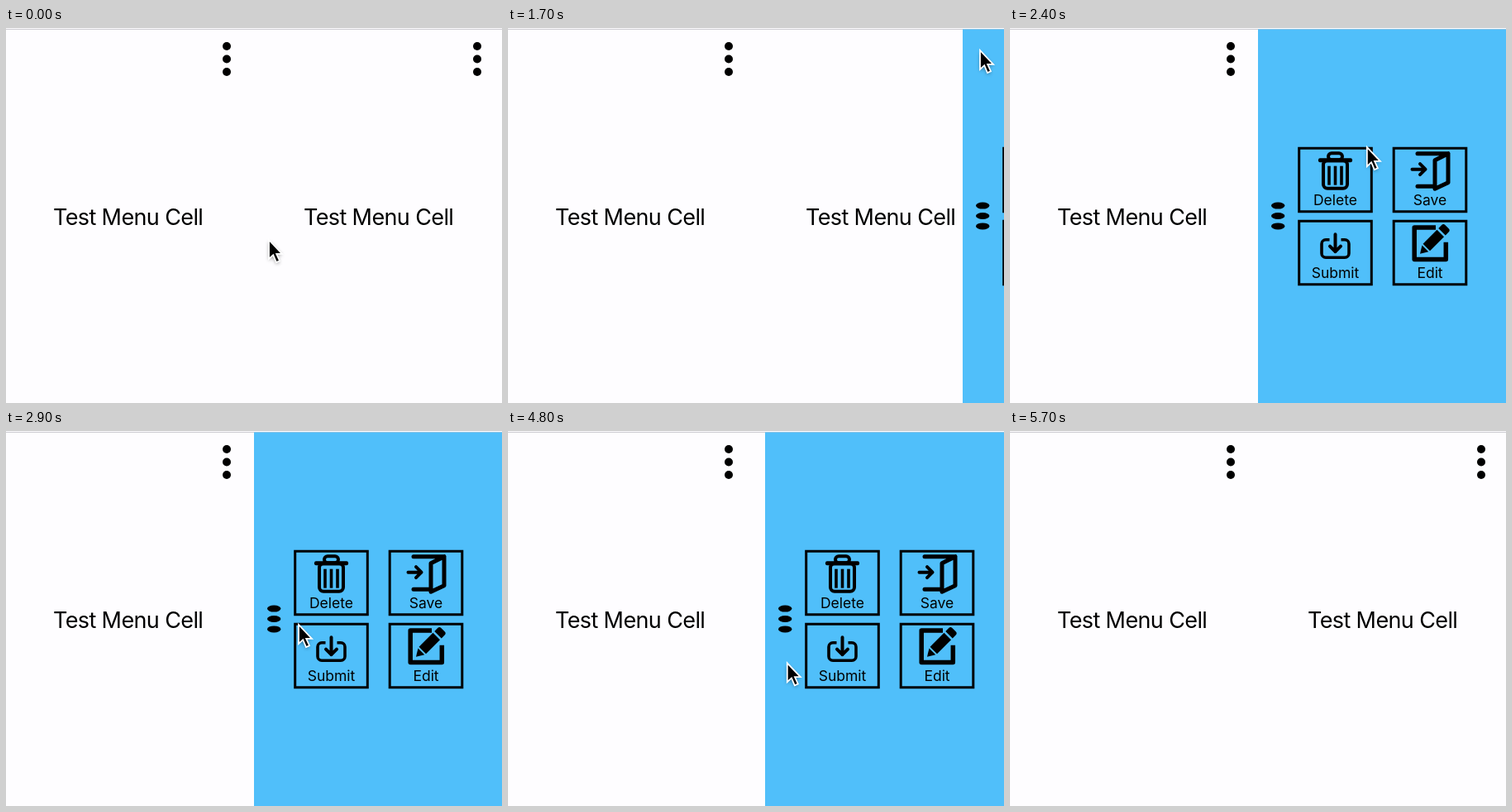
Recreate the animation shown at these times as an HTML page with a canvas. Size 600 by 453 pixels, loop 8.9 s.

```html
<!DOCTYPE html>
<html lang="en">
<head>
<meta charset="utf-8">
<title>Cell menu</title>
<style>
  html, body { margin: 0; width: 100%; height: 100%; overflow: hidden; background: #fefdff; }
  canvas { display: block; width: 600px; height: 453px; }
</style>
</head>
<body>
<canvas id="stage" width="600" height="453"></canvas>
<script>
const ctx = document.getElementById('stage').getContext('2d');
const W = 600, H = 453, LOOP = 8900, STEP = 100;
const PAPER = '#fefdff', BLUE = '#50bffa', INK = '#000', RULE = '#cbcad0';
const OPEN_AT = 1417, CLOSE_AT = 4664, SLIDE = 1000;

const HOME = { x: 318, y: 256 };
const TRIPS = [
  { from: 0, to: 400, x: 570, y: 470 },               // off the bottom edge
  { from: 400, to: 500, x: 529, y: 470 },
  { from: 500, to: 1100, x: 571, y: 27 },             // onto the cell's dots
  { from: 1700, to: 2900, x: 354, y: 234, bend: -17 },
  { from: 2900, to: 3300, x: 512, y: 278 },           // over the buttons
  { from: 3300, to: 3800, x: 319, y: 220, bend: -90 },
  { from: 4700, to: 5000, x: 400, y: 480 }            // off again
];

const clamp = v => Math.min(1, Math.max(0, v));
const mix = (a, b, k) => a + (b - a) * k;

// Cubic ease-in-out with control points (.42, 0) and (.58, 1).
function ease(x) {
  x = clamp(x);
  let lo = 0, hi = 1;
  for (let i = 0; i < 24; i++) {
    const s = (lo + hi) / 2, r = 1 - s;
    if (3 * r * r * s * 0.42 + 3 * r * s * s * 0.58 + s ** 3 < x) lo = s;
    else hi = s;
  }
  return lo * lo * (3 - 2 * lo);
}

function panelX(t) {
  const shown = ease((t - OPEN_AT) / SLIDE) - ease((t - CLOSE_AT) / SLIDE);
  return Math.round(W - 300 * shown);
}

function pointerAt(t) {
  let { x, y } = HOME;
  for (const trip of TRIPS) {
    const k = ease((t - trip.from) / (trip.to - trip.from));
    x = mix(x, trip.x, k);
    y = mix(y, trip.y, k) + (trip.bend || 0) * 4 * k * (1 - k);
  }
  return [x, y];
}

function dots(x, y, gap, rx, ry) {
  ctx.fillStyle = INK;
  for (let i = -1; i <= 1; i++) {
    ctx.beginPath();
    ctx.ellipse(x, y + i * gap, rx, ry, 0, 0, Math.PI * 2);
    ctx.fill();
  }
}

function label(text, x, y, size, spacing = 0) {
  ctx.font = `${size}px Inter, "Open Sans", sans-serif`;
  ctx.letterSpacing = spacing + 'px';
  ctx.textAlign = 'center';
  ctx.fillStyle = INK;
  ctx.fillText(text, x, y);
}

function line(width, d) {
  ctx.lineWidth = width;
  ctx.stroke(new Path2D(d));
}

// A rounded box centred on x = 0; filled unless a line width is given.
function box(w, top, h, radius, width) {
  ctx.beginPath();
  ctx.roundRect(-w / 2, top, w, h, radius);
  if (!width) return ctx.fill();
  ctx.lineWidth = width;
  ctx.stroke();
}

function arrow(tipX, tipY, length, angle) {
  ctx.save();
  ctx.translate(tipX, tipY);
  ctx.rotate(angle);
  line(4, `M${-length} 0H0M-6.5 -6.5L0 0L-6.5 6.5`);
  ctx.restore();
}

// Icons are centred on x = 0, with y from the button's top edge.
function trash() {
  box(17, 7.5, 8, 4, 4);
  box(41, 13.5, 5, 2);
  box(29, 16.5, 33.5, 5, 4);
  for (let i = -1; i <= 1; i++) ctx.fillRect(i * 7.5 - 1.8, 23, 3.6, 23);
}

function door() {
  line(5, 'M-15 8H22V43L6 50.5V16L22 8M-15 47.5H5');
  arrow(-5.5, 27, 16, 0);
}

function tray() {
  box(33, 24, 21.5, 5, 3.6);
  ctx.fillStyle = BLUE;
  ctx.fillRect(-7, 21, 14, 6);
  arrow(0, 38.5, 21, Math.PI / 2);
}

function pencil() {
  ctx.lineJoin = ctx.lineCap = 'butt';
  line(5.5, 'M7 9.2H-18.8V47.8H19.3V27');
  ctx.translate(-12, 41);
  ctx.rotate(Math.PI / 4);
  ctx.fill(new Path2D('M0 0L-5.5 -9H5.5Z'));
  box(12, -35, 24, 0);
  box(12, -46, 8.5, [3, 3, 0, 0]);
}

const BUTTONS = [['Delete', trash], ['Save', door], ['Submit', tray], ['Edit', pencil]];

function button([name, icon], i) {
  ctx.save();
  ctx.translate(93.5 + i % 2 * 114.5, 143.7 + (i >> 1) * 88);
  ctx.strokeStyle = ctx.fillStyle = INK;
  box(87.6, 1.5, 76.5, 0, 3);
  label(name, 0, 70.3, 17.5);
  ctx.lineCap = ctx.lineJoin = 'round';
  icon();
  ctx.restore();
}

function cell(x) {
  label('Test Menu Cell', x + 147.6, 238, 27, -0.62);
  dots(x + 267, 37.5, 15.5, 5, 5);
}

function panel(x) {
  ctx.save();
  ctx.translate(x, 0);
  ctx.fillStyle = BLUE;
  ctx.fillRect(0, 1.5, W - x, H);
  dots(24.2, 227, 12.4, 8.2, 4);
  BUTTONS.forEach(button);
  ctx.restore();
}

function pointer(x, y) {
  const shape = new Path2D('M0 0V23L5.2 18.2L9 27L13 25.2L9.2 16.8H16Z');
  ctx.save();
  ctx.translate(x, y);
  ctx.save();
  ctx.shadowColor = 'rgba(0,0,0,.4)';
  ctx.shadowBlur = 4;
  ctx.shadowOffsetY = 2;
  ctx.fillStyle = INK;
  ctx.fill(shape);
  ctx.restore();
  ctx.strokeStyle = '#fff';
  ctx.lineWidth = 1.8;
  ctx.stroke(shape);
  ctx.restore();
}

function draw(t) {
  ctx.fillStyle = PAPER;
  ctx.fillRect(0, 0, W, H);
  ctx.fillStyle = RULE;
  ctx.fillRect(0, 1, W, 1);
  cell(0);
  cell(303);
  const x = panelX(t);
  if (x < W) panel(x);
  pointer(...pointerAt(t));
}

const start = performance.now();
function tick() {
  const t = (performance.now() - start) % LOOP;
  draw(Math.floor(t / STEP) * STEP);
  requestAnimationFrame(tick);
}
tick();
</script>
</body>
</html>
```
